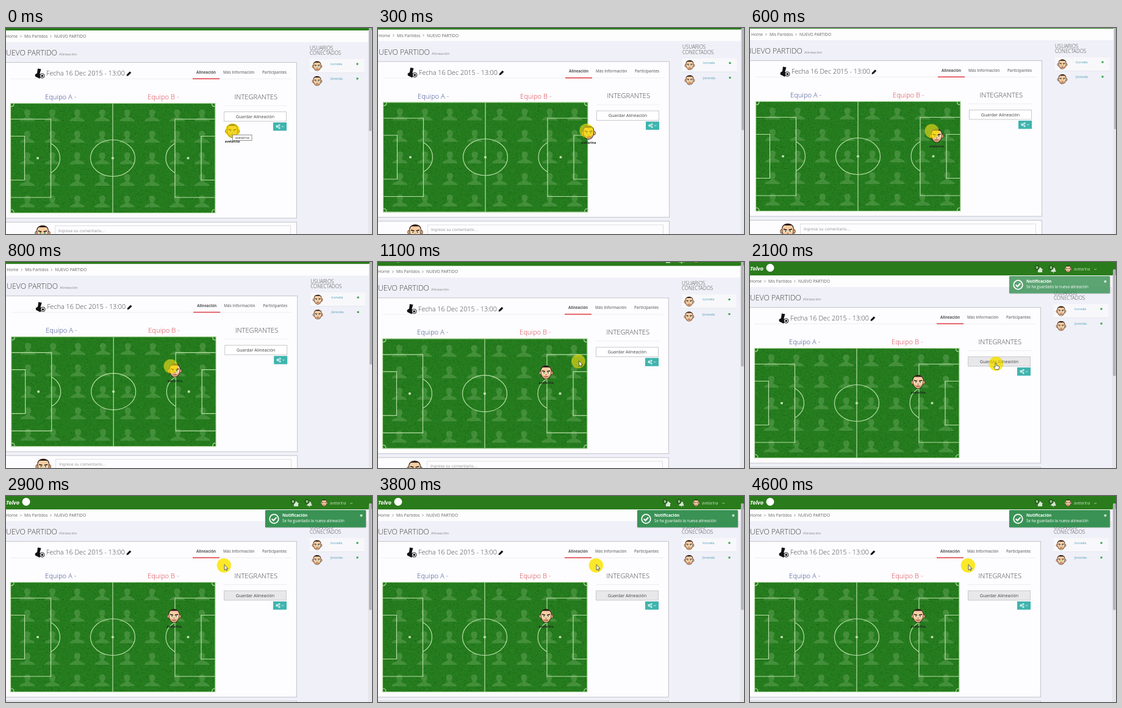
These frames come from a looping animation (600 px wide and 338 px high, 4.7 s). An HTML page with a canvas:

```html
<!DOCTYPE html>
<html lang="es">
<head>
<meta charset="utf-8">
<title>Nuevo partido</title>
<style>
  html, body { margin: 0; width: 100%; height: 100%; overflow: hidden; background: #f0f0f8; }
  #stage { position: relative; width: 600px; height: 338px; overflow: hidden; }
  #world, #stage svg, #halo { position: absolute; left: 0; top: 0; }
  #halo { width: 23px; height: 23px; margin: -11.5px; border-radius: 50%; background: #fbe928; mix-blend-mode: multiply; }
  svg { overflow: visible; display: block; }
  #grass { position: absolute; left: 7px; top: 141px; }
  text { font-family: "Open Sans", "Noto Sans", sans-serif; font-size: 6.7px; fill: #666; }
  .h { font-weight: 300; font-size: 11.2px; fill: #444; }
  .tab { font-size: 6.3px; font-weight: 600; fill: #777; }
  .side { font-weight: 300; font-size: 8.1px; fill: #444; }
  .user { font-size: 5.2px; fill: #4a9cb0; }
  .tag { font-size: 5.2px; font-weight: 700; fill: #222; text-anchor: middle; }
  .badge { font-size: 6px; font-weight: 700; fill: #fff; text-anchor: middle; }
  .lines { fill: none; stroke: #b9dfa8; stroke-width: 1.2; }
</style>
</head>
<body>
<div id="stage">
  <div id="world">
    <svg width="600" height="380">
      <defs>
        <symbol id="face" viewBox="-12 -12 24 24" overflow="visible">
          <g fill="#f0b983" stroke="#3a2218" stroke-width=".8">
            <ellipse cx="-9.300" cy="1.500" rx="2" ry="3"/>
            <ellipse cx="9.300" cy="1.500" rx="2" ry="3"/>
          </g>
          <path d="M-9-3C-9-13 9-13 9-3L8.600 4C7 9 4 12 0 12S-7 9-8.600 4Z" fill="#2b1a14"/>
          <path d="M-8.200-2C-8-5-6.500-7.500-5-7.500H5C6.500-7.500 8-5 8.200-2L7.800 3.500C6.500 8 3 11.200 0 11.200S-6.500 8-7.800 3.500Z" fill="#f7cda3"/>
          <path d="M-7.800 3.500C-6.500 8-3 11.200 0 11.200S6.500 8 7.800 3.500L4.500 6.500H-4.500Z" fill="#d3a07a"/>
          <path d="M-6.500-1.800L-1.500-.600M6.500-1.800L1.500-.600" stroke="#2b1a14" stroke-width="1.500"/>
          <ellipse cx="-3.800" cy="1.300" rx="2" ry="1.300" fill="#fff"/>
          <ellipse cx="3.800" cy="1.300" rx="2" ry="1.300" fill="#fff"/>
          <circle cx="-3.500" cy="1.300" r="1.100" fill="#3c6a35"/>
          <circle cx="3.500" cy="1.300" r="1.100" fill="#3c6a35"/>
          <path d="M-1 4.500H1M-2.500 7.500H2.500" stroke="#8a4a32"/>
        </symbol>
        <symbol id="person" viewBox="-13 -11 26 22" overflow="visible">
          <path d="M-5-5C-5-11 5-11 5-5C5-1 3 1 2.600 2C3 5 12 5 12.500 10H-12.500C-12 5-3 5-2.600 2C-3 1-5-1-5-5Z" fill="#b5d9a5" fill-opacity=".22"/>
        </symbol>
        <symbol id="gear" viewBox="-4 -4 8 8" overflow="visible">
          <circle r="2" fill="none" stroke="#fff" stroke-width="1.800"/>
          <circle r="3" fill="none" stroke="#fff" stroke-width="1" stroke-dasharray="1.200 1.156"/>
        </symbol>
      </defs>

      <rect x="-5" width="610" height="380" fill="#f0f0f8"/>
      <rect x="-5" y="21" width="599" height="20" fill="#fdfdfe"/>
      <rect x="-5" width="610" height="22" fill="#2a7b1b"/>

      <!-- top bar -->
      <text x="0" y="14" style="font-size:9px;font-weight:700;font-style:italic;fill:#fff">Tolvo</text>
      <circle cx="33" cy="9.500" r="6.500" fill="#fff"/>
      <path d="M470.500 13L475.500 8.500L480.500 13H479V17H472V13Z" fill="#d8e6d4"/>
      <path d="M493 16C495 14 494 9 497.500 9S500 14 502 16ZM496 16.500H499L497.500 18Z" fill="#d8e6d4"/>
      <circle cx="470.500" cy="9" r="4" fill="#245f19"/><circle cx="493.500" cy="9" r="4" fill="#245f19"/>
      <text class="badge" x="470.500" y="11.200">0</text><text class="badge" x="493.500" y="11.200">0</text>
      <use href="#face" x="515.500" y="5" width="12" height="12"/>
      <text x="531" y="14.200" style="font-size:6.2px;fill:#c9dfc2">avelarina</text>
      <path d="M564.500 11L566.300 12.800L568.100 11" fill="none" stroke="#c9dfc2" stroke-width=".9"/>

      <!-- breadcrumb and title -->
      <text x="0" y="34">Home</text>
      <text x="30" y="34">Mis Partidos</text>
      <text x="79" y="34">NUEVO PARTIDO</text>
      <path d="M23.500 29.800L25.300 31.600L23.500 33.400M72.500 29.800L74.300 31.600L72.500 33.400" fill="none" stroke="#777" stroke-width=".8"/>
      <text class="h" x="84" y="63" text-anchor="end" style="font-size:12.3px">NUEVO PARTIDO</text>
      <text x="87" y="63" style="font-size:6.1px;fill:#888">Alineación</text>

      <!-- panels -->
      <g fill="#fdfcfe" stroke="#c3c3ca">
        <rect x="-6" y="74.500" width="482.500" height="255.500"/>
        <rect x="-6" y="336.500" width="482.500" height="60"/>
        <rect x="80.500" y="342.500" width="386" height="40" stroke="#dedee2"/>
      </g>
      <path d="M7 101.500H468M357 145.500H461" stroke="#eeeef2"/>
      <use href="#face" x="47" y="340" width="26" height="26"/>
      <text x="86" y="352.500" style="font:6.3px 'DejaVu Sans',sans-serif;fill:#999">Ingrese su comentario...</text>

      <g fill="#111">
        <path d="M52 84.500L57.500 85.500L55.500 92.500L57 97.500L55 101L48 97.500L47.500 94.500L51 92Z"/>
        <circle cx="59.300" cy="96.500" r="3.700" fill="#fff" stroke="#111"/>
        <path d="M59.300 94.500L61.300 96L60.500 98.300H58.100L57.300 96Z"/>
        <path d="M197.500 97L198.200 94.200L203 89.300L205.300 91.600L200.400 96.300Z"/>
      </g>
      <text class="h" x="66" y="96.300" style="font-size:10.8px">Fecha 16 Dec 2015 - 13:00</text>
      <text class="tab" x="312" y="92.800" style="font-size:6.1px;font-weight:700;fill:#555">Alineación</text>
      <text class="tab" x="356" y="92.800">Más Información</text>
      <text class="tab" x="420" y="92.800">Participantes</text>
      <rect x="306" y="100.500" width="44" height="1.600" fill="#e0434b"/>

      <text class="h" x="64" y="135" style="fill:#3a4d8f">Equipo A -</text>
      <text class="h" x="232" y="135" style="fill:#d8434b">Equipo B -</text>
      <text class="h" x="374.500" y="134.500">INTEGRANTES</text>

      <rect id="save" x="357.500" y="155.500" width="102" height="15.500" fill="#fff" stroke="#c9c9cd"/>
      <text x="408.500" y="165.700" text-anchor="middle" style="font-size:7.1px;fill:#444">Guardar Alineación</text>
      <rect x="438" y="173" width="22" height="13.500" fill="#3fb4ae"/>
      <use href="#gear" x="442" y="177" width="5" height="5"/>
      <use href="#gear" x="446" y="175.500" width="4" height="4"/>
      <use href="#gear" x="446" y="180" width="4" height="4"/>
      <path d="M452.200 179L453.700 180.500L455.200 179" fill="none" stroke="#fff" stroke-width=".9"/>

      <!-- connected users -->
      <text class="side" x="498" y="53.800">USUARIOS</text>
      <text class="side" x="498" y="62">CONECTADOS</text>
      <rect x="498" y="69" width="89.500" height="22.500" fill="#f8f8fb"/>
      <path d="M498 91.500H588" stroke="#e6e6ed"/>
      <use href="#face" x="501.500" y="71.500" width="17" height="17"/>
      <use href="#face" x="501.500" y="96" width="17" height="17"/>
      <text class="user" x="532" y="78.700">tcorvela</text>
      <text class="user" x="532" y="103.200">jlorenda</text>
      <circle cx="576" cy="77" r="1.700" fill="#35a545"/><circle cx="576" cy="101" r="1.700" fill="#35a545"/>

      <rect x="593.500" y="21.500" width="12" height="360" fill="#e6e6ec"/>
      <rect x="595" y="12" width="4.500" height="175" rx="1.500" fill="#b4b4ba"/>
    </svg>

    <canvas id="grass" width="336" height="181"></canvas>

    <svg width="600" height="380">
      <g id="people"></g>
      <g class="lines">
        <rect x="7.500" y="141.500" width="335.500" height="180"/>
        <path d="M175 142V321"/>
        <ellipse cx="175" cy="231.500" rx="36.500" ry="30"/>
        <g id="half">
          <path d="M8 167.500H73.500V296H8M8 195.500H30.500V267.500H8M73.500 207.300A36.500 30 0 0 1 73.500 255.700M8 147Q13 147 13 142M8 316Q13 316 13 321"/>
          <circle cx="52" cy="231.500" r="1.500" fill="#cfe8c0"/>
        </g>
        <use href="#half" transform="translate(350.500)scale(-1 1)"/>
        <circle cx="175" cy="231.500" r="1.500" fill="#cfe8c0"/>
      </g>
      <g id="player">
        <use href="#face" x="-12" y="-12" width="24" height="24"/>
        <text class="tag" y="19.500">avelarina</text>
      </g>
    </svg>
  </div>

  <div id="halo"></div>

  <svg width="600" height="338">
    <g id="toast">
      <rect x="424.500" y="23.500" width="167" height="29" rx="2" fill="#000" opacity=".15"/>
      <rect x="425" y="23" width="165" height="28.500" rx="1.500" fill="#348f50"/>
      <circle cx="439.500" cy="37.500" r="7.300" fill="none" stroke="#fff" stroke-width="1.800"/>
      <path d="M435.800 37.500L438.500 40.300L443.300 35" fill="none" stroke="#fff" stroke-width="2.200"/>
      <text x="453" y="34.200" style="font-size:6.8px;font-weight:700;fill:#fff">Notificación</text>
      <text x="453" y="43.200" style="font-size:6.2px;fill:#fff">Se ha guardado la nueva alineación</text>
      <path d="M580.800 30.300L584 33.500M584 30.300L580.800 33.500" stroke="#fff" stroke-width="1.200"/>
    </g>
    <g id="pointer">
      <circle r="11.500" fill="#fbe928" opacity=".6"/>
      <path id="arrow" d="M1-1V8L3 6.300L4.300 9L5.600 8.400L4.400 5.700H7Z" fill="#fff" stroke="#222" stroke-width=".7"/>
      <path id="hand" d="M-1-.500Q0-1.500 1-.500V3.500L5 4.300Q6 4.500 5.500 7L4.500 10H-.500L-3.500 6Q-3.500 4.500-1 6Z" fill="#fff" stroke="#222" stroke-width=".7"/>
    </g>
    <g id="tip">
      <rect x="371.500" y="175.500" width="31.500" height="9" fill="#fff" stroke="#777" stroke-width=".8"/>
      <text x="387.300" y="182" text-anchor="middle" style="font-size:5.4px;fill:#333">avelarina</text>
    </g>
  </svg>
</div>

<script>
const LOOP = 4700, STEP = 100;
const $ = id => document.getElementById(id);

// each row: time, then values
const camera = [[0, 0, -18], [600, 2, -21], [1100, 0, -15.6], [1300, 0, 0]];
const player = [[0, 371, 186], [100, 371, 186], [600, 304, 197], [800, 275.5, 196]];
const cursor = [[0, 371, 168], [100, 371, 168], [600, 298, 169], [800, 270, 171],
  [1100, 328.5, 163], [1300, 393, 167], [2100, 403, 166.5], [2300, 403, 166.5], [2800, 357, 113.5]];
const toast = [[1800, 0], [2100, 0.8], [2400, 0.97]];

function at(rows, t) {
  if (t <= rows[0][0]) return rows[0].slice(1);
  const i = rows.findIndex(r => r[0] > t);
  if (i < 0) return rows[rows.length - 1].slice(1);
  const a = rows[i - 1], b = rows[i], k = (t - a[0]) / (b[0] - a[0]);
  return a.slice(1).map((v, j) => v + (b[j + 1] - v) * k);
}

function sowGrass() {
  const c = $('grass'), g = c.getContext('2d');
  let seed = 7;
  const rnd = () => (seed = (seed * 16807) % 2147483647) / 2147483647;
  g.fillStyle = '#257c1e';
  g.fillRect(0, 0, c.width, c.height);
  for (let i = 0; i < 16000; i++) {
    g.fillStyle = rnd() < 0.5 ? 'rgba(8,70,8,.2)' : 'rgba(66,150,46,.18)';
    g.fillRect(Math.floor(rnd() * c.width), Math.floor(rnd() * c.height), 1 + Math.floor(rnd() * 2), 1);
  }
}

function placePeople() {
  let s = '';
  for (let r = 0; r < 5; r++)
    for (let c = 0; c < 8; c++)
      s += `<use href="#person" x="${22 + c * 40.9}" y="${150 + r * 35.3}" width="26" height="22"/>`;
  $('people').innerHTML = s;
}

const move = (id, [x, y]) => $(id).setAttribute('transform', `translate(${x} ${y})`);
const shift = (id, [x, y]) => { $(id).style.transform = `translate(${x}px, ${y}px)`; };
const show = (id, on) => { $(id).style.display = on ? '' : 'none'; };

function draw(now) {
  const t = Math.floor((now % LOOP) / STEP) * STEP;
  const spot = at(cursor, t);
  shift('world', at(camera, t));
  shift('halo', spot);
  move('player', at(player, t));
  move('pointer', spot);
  $('toast').style.opacity = at(toast, t)[0];
  $('save').setAttribute('fill', t >= 1300 ? '#e8e8ea' : '#fff');
  show('hand', t >= 1300 && t < 2500);
  show('arrow', t >= 2500 || (t >= 900 && t < 1300));
  show('tip', t < 200);
}

sowGrass();
placePeople();
draw(0);
const start = performance.now();
requestAnimationFrame(function tick() {
  draw(performance.now() - start);
  requestAnimationFrame(tick);
});
</script>
</body>
</html>
```
